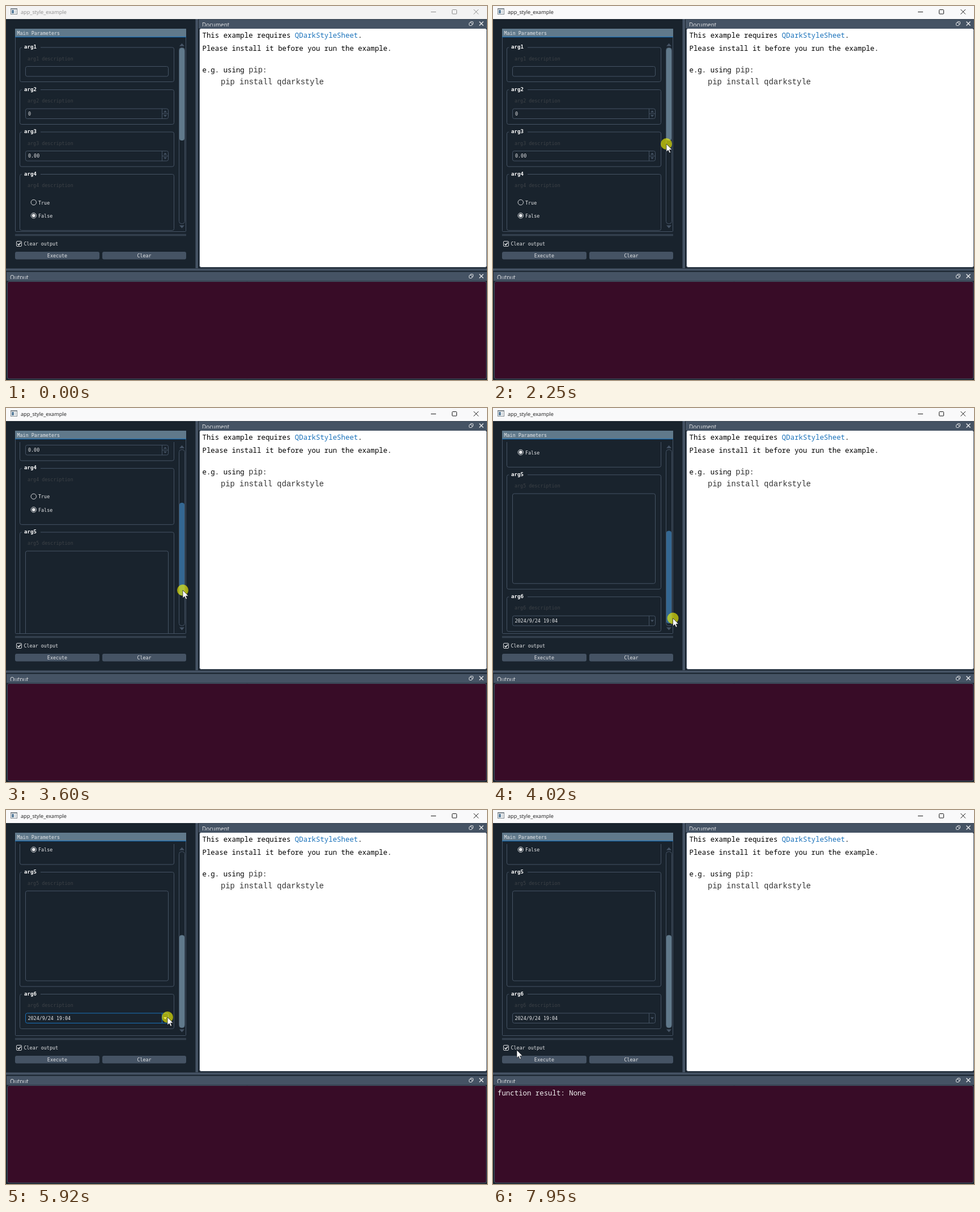
Animation of 849x659 px, one loop 8 s. Source, as an HTML page with a canvas:

```html
<!DOCTYPE html>
<html lang="en">
<head>
<meta charset="utf-8">
<title>app_style_example</title>
<style>
  html, body { margin: 0; width: 100%; height: 100%; overflow: hidden; background: #19232d; }
  canvas { display: block; width: 849px; height: 659px; }
</style>
</head>
<body>
<canvas id="stage" width="849" height="659"></canvas>
<script>
const ctx = document.getElementById('stage').getContext('2d', { alpha: false });
const LOOP = 8000;
const BG = '#19232d', EDGE = '#455364', LIGHT = '#60798b', HOVER = '#54687a';
const BLUE = '#346792', FOCUS = '#1a72bb', TEXT = '#e6e7e9', DIM = '#3d4247';
const UI = '8.4px "DejaVu Sans Mono", monospace';
const UI_BOLD = 'bold 9.1px "DejaVu Sans Mono", monospace';
const TITLE = '9.2px "Open Sans", sans-serif';
const DOCK = '9.9px "Open Sans", sans-serif';
const DOC = '12.38px "Noto Sans Mono", monospace';
const CODE = '13.8px "Liberation Mono", monospace';
const CJK = '8.4px "Noto Sans CJK SC", "Noto Sans CJK", sans-serif';

const THUMB = 163, THUMB_RUN = 146.5, SCROLL_RUN = 299.5, GRAB_Y = 228;

// pointer path: time, x, y
const path = [
  [130, 611, 603], [500, 470, 402], [890, 325, 194], [1300, 325, 194], [1650, 313, 232],
  [1780, 313, 232], [1920, 306, 234], [2050, 306, 234], [2120, 306, 241], [2250, 306, 243],
  [2310, 306, 243], [2550, 306, 268], [2860, 306, 228], [2930, 306, 229], [3600, 312, 321],
  [3665, 312, 321], [4050, 318, 374.5], [4230, 319, 393], [4300, 318, 391], [4490, 296, 375],
  [4560, 295, 374], [4850, 287, 367], [4990, 285, 365], [6050, 285, 365], [6250, 150, 363],
  [6320, 150, 363], [6540, 102, 438], [7540, 102, 438], [7950, 42, 423], [8000, 42, 423]
];
const presses = [[1030, 1240], [2120, 2500], [2860, 4300], [5190, 5320], [5920, 6050], [6740, 6940]];

const within = (t, a, b) => t >= a && t < b;
const clamp = v => Math.max(0, Math.min(1, v));

function pointerAt(t) {
  if (t < path[0][0]) return null;
  let i = 1;
  while (i < path.length - 1 && path[i][0] < t) i++;
  const [t0, x0, y0] = path[i - 1], [t1, x1, y1] = path[i];
  const k = clamp((t - t0) / (t1 - t0));
  return { x: x0 + (x1 - x0) * k, y: y0 + (y1 - y0) * k };
}

function text(s, x, y, font, color, align = 'left') {
  ctx.font = font;
  ctx.fillStyle = color;
  ctx.textAlign = align;
  ctx.fillText(s, x, y);
  return x + ctx.measureText(s).width;
}

function rect(x, y, w, h, color) {
  ctx.fillStyle = color;
  ctx.fillRect(x, y, w, h);
}

function round(x, y, w, h, r, fill, stroke) {
  ctx.beginPath();
  ctx.roundRect(x, y, w, h, r);
  if (fill) { ctx.fillStyle = fill; ctx.fill(); }
  if (stroke) { ctx.strokeStyle = stroke; ctx.lineWidth = 1; ctx.stroke(); }
}

function line(color, width, ...pts) {
  ctx.beginPath();
  for (let i = 0; i < pts.length; i += 2) ctx.lineTo(pts[i], pts[i + 1]);
  ctx.strokeStyle = color;
  ctx.lineWidth = width;
  ctx.stroke();
}

function disc(x, y, r, fill, stroke) {
  ctx.beginPath();
  ctx.arc(x, y, r, 0, Math.PI * 2);
  if (fill) { ctx.fillStyle = fill; ctx.fill(); }
  if (stroke) { ctx.strokeStyle = stroke; ctx.lineWidth = 1; ctx.stroke(); }
}

// triangle pointing up (dir -1) or down (dir 1)
function arrow(x, y, w, h, dir, color) {
  ctx.beginPath();
  ctx.moveTo(x - w, y - h * dir);
  ctx.lineTo(x + w, y - h * dir);
  ctx.lineTo(x, y + h * dir);
  ctx.fillStyle = color;
  ctx.fill();
}

function clip(x, y, w, h, draw) {
  ctx.save();
  ctx.beginPath();
  ctx.rect(x, y, w, h);
  ctx.clip();
  draw();
  ctx.restore();
}

function titleBar(active) {
  const ink = active ? '#1a1a1a' : '#8c8c8c';
  rect(0, 0, 849, 23, active ? '#f9f9fa' : '#f3f3f3');
  rect(8, 4, 12, 11, '#7c858c');
  rect(9, 6, 10, 8, '#ffffff');
  rect(10, 7, 4, 6, '#5b7f9d');
  rect(15, 7, 3, 6, '#d5dade');
  text('app_style_example', 26, 14, TITLE, ink);
  line(ink, 1, 750, 10.5, 759, 10.5);
  round(787.5, 6.5, 8, 7.5, 1, null, ink);
  line(ink, 1, 825.5, 6, 834, 14.5);
  line(ink, 1, 834, 6, 825.5, 14.5);
}

function dockTitle(label, x, y) {
  rect(x, y, 849 - x, 16, EDGE);
  clip(x, y, 300, 12.5, () => text(label, x + 6, y + 13.5, DOCK, TEXT));
  const cy = y + 7.5;
  round(819.5, cy - 3.5, 5, 5, 1, null, TEXT);
  round(817.5, cy - 1.5, 5, 5, 1, EDGE, TEXT);
  line(TEXT, 1.4, 835.5, cy - 3.5, 842.5, cy + 3.5);
  line(TEXT, 1.4, 842.5, cy - 3.5, 835.5, cy + 3.5);
}

function group(label, top, bottom) {
  round(24.5, top, 272, bottom - top, 3, null, EDGE);
  rect(28, top - 2, 33, 4, BG);
  text(label, 32, top + 2, UI_BOLD, '#ffffff');
  text(label + ' description', 38, top + 22.5, UI, DIM);
}

function spinBox(y, value) {
  round(34.5, y, 252, 17.5, 3, null, EDGE);
  text(value, 39, y + 11.7, UI, TEXT);
  line(EDGE, 1, 275.5, y, 275.5, y + 17.5);
  line(EDGE, 1, 275.5, y + 8.8, 286.5, y + 8.8);
  arrow(281, y + 4.8, 3, 1.7, -1, EDGE);
  arrow(281, y + 12.8, 3, 1.7, 1, EDGE);
}

function radio(y, label, on) {
  disc(48.8, y, 4.7, null, '#d5d7da');
  if (on) disc(48.8, y, 3, '#e6e7e9');
  text(label, 57, y + 3.5, UI, TEXT);
}

function dateField(y, t) {
  const focused = within(t, 5190, 6740), hot = within(t, 4780, 5190);
  const edge = focused ? FOCUS : hot ? BLUE : EDGE;
  round(34.5, y, 252, 17.5, 3, null, edge);
  line(edge, 1, 275.5, y, 275.5, y + 17.5);
  arrow(281, y + 9, 3, 1.7, 1, focused ? TEXT : edge);
  text('2024/9/24 19:04', 38.5, y + 11.8, UI, TEXT);
}

function form(scroll, t) {
  clip(17, 60, 288, 337, () => {
    ctx.translate(0, -scroll);
    group('arg1', 73, 133.5);
    round(34.5, 106.5, 252, 17.5, 3, null, EDGE);
    group('arg2', 147.5, 208.5);
    spinBox(181, '0');
    group('arg3', 222, 283);
    spinBox(255.5, '0.00');
    group('arg4', 296.5, 395.5);
    radio(346, 'True', false);
    radio(369.3, 'False', true);
    group('arg5', 409, 610.5);
    round(34.5, 442.2, 252, 158.3, 3, null, EDGE);
    group('arg6', 624, 685);
    dateField(657.5, t);
  });
}

function scrollBar(offset, hot) {
  round(305.5, 73.5, 10, 310, 4, null, EDGE);
  arrow(310.5, 68.2, 4.5, 2.5, -1, EDGE);
  arrow(310.5, 389, 4.5, 2.5, 1, EDGE);
  round(306, 74 + offset, 9, THUMB, 4, hot ? BLUE : LIGHT);
}

function button(x, w, label, color) {
  round(x, 433, w, 13.5, 3, color);
  text(label, x + w / 2, 443.2, UI, TEXT, 'center');
}

function executeColor(t) {
  if (within(t, 6740, 6940)) return LIGHT;
  return within(t, 6480, 6740) || within(t, 7470, 7720) ? HOVER : EDGE;
}

function leftPanel(t, scroll) {
  round(16.5, 40.5, 301, 357, 1, null, EDGE);
  rect(16, 40, 302, 15, LIGHT);
  rect(16, 54, 302, 1.2, FOCUS);
  text('Main Parameters', 19.5, 50.5, UI, TEXT);
  form(scroll * SCROLL_RUN, t);
  scrollBar(scroll * THUMB_RUN, within(t, 1780, 2120) || within(t, 2800, 4300));

  line(EDGE, 1, 16, 402.5, 318, 402.5);
  line(EDGE, 1, 16, 404.5, 318, 404.5);
  round(18.5, 414.5, 9, 9, 1.5, null, '#d5d7da');
  line(TEXT, 1.5, 20.5, 419, 22.5, 421.3, 26, 416.7);
  text('Clear output', 31.5, 422.3, UI, TEXT);
  button(16, 149, 'Execute', executeColor(t));
  button(170, 148, 'Clear', EDGE);
}

function documentPane() {
  dockTitle('Document', 340, 23.5);
  round(341.5, 39.5, 507, 421, 3, '#ffffff', EDGE);
  let x = text('This example requires ', 346.5, 56.3, DOC, '#000');
  x = text('QDarkStyleSheet', x, 56.3, DOC, '#1a72bb');
  text('.', x, 56.3, DOC, '#000');
  text('Please install it before you run the example.', 346.5, 78.7, DOC, '#000');
  x = text('e.g. using ', 346.5, 117, DOC, '#000');
  x = text('pip', x, 117, CODE, '#333');
  text(':', x, 117, DOC, '#000');
  text('pip install qdarkstyle', 379, 138.3, CODE, '#333');
}

function outputPane(t) {
  rect(0, 462.5, 849, 4, EDGE);
  dockTitle('Output', 1, 468.5);
  round(2.5, 485.5, 845.5, 171.5, 3, '#380c27', EDGE);
  if (t >= 6940) text('function result: None', 8, 503, DOC, '#f0f0f0');
}

function calendar() {
  const x = 34, y = 377, w = 218, h = 164, cw = w / 8, rh = 20.5;
  rect(x, y, w, h, BG);
  rect(x, y, w, 20, EDGE);
  arrow(x + 10, y + 10, 4, 2.5, -1, TEXT);
  arrow(x + w - 10, y + 10, 4, 2.5, 1, TEXT);
  text('九月  2024', x + w / 2, y + 13, CJK, TEXT, 'center');
  [...'一二三四五六日'].forEach((d, c) =>
    text('周' + d, x + cw * (c + 1.5), y + 33, CJK, c > 4 ? '#ff4040' : TEXT, 'center'));
  for (let r = 0; r < 6; r++) {
    const ty = y + 53 + r * rh;
    text(35 + r, x + cw / 2, ty, UI, LIGHT, 'center');
    for (let c = 0; c < 7; c++) {
      const day = r * 7 + c - 5;
      const label = day < 1 ? day + 31 : day > 30 ? day - 30 : day;
      const color = label !== day ? LIGHT : c > 4 ? '#ff4040' : TEXT;
      if (day === 24) rect(x + cw * (c + 1), ty - 13, cw, rh, BLUE);
      text(label, x + cw * (c + 1.5), ty, UI, color, 'center');
    }
  }
  round(x + .5, y + .5, w - 1, h - 1, 0, null, EDGE);
}

function pointer({ x, y }, pressed) {
  if (pressed) disc(x, y, 10, 'rgba(255,255,0,.6)');
  ctx.save();
  ctx.translate(x, y);
  ctx.beginPath();
  [[0, 0], [0, 14], [3.2, 11], [5.4, 15.9], [7.6, 14.9], [5.5, 10.2], [10, 10.2]]
    .forEach(p => ctx.lineTo(...p));
  ctx.closePath();
  ctx.fillStyle = '#fff';
  ctx.fill();
  ctx.strokeStyle = '#10151a';
  ctx.lineWidth = .7;
  ctx.stroke();
  ctx.restore();
}

function draw(t) {
  const p = pointerAt(t);
  const scroll = t < 2930 ? 0 : t < 4100 ? clamp((p.y - GRAB_Y) / THUMB_RUN) : 1;
  rect(0, 0, 849, 659, BG);
  titleBar(t >= 1030);
  rect(334.5, 23, 4.5, 439, EDGE);
  documentPane();
  leftPanel(t, scroll);
  outputPane(t);
  if (within(t, 5190, 5920)) calendar();
  if (p) pointer(p, presses.some(([a, b]) => within(t, a, b)));
}

const start = performance.now();
function tick() {
  draw((performance.now() - start) % LOOP);
  requestAnimationFrame(tick);
}
tick();
</script>
</body>
</html>
```
